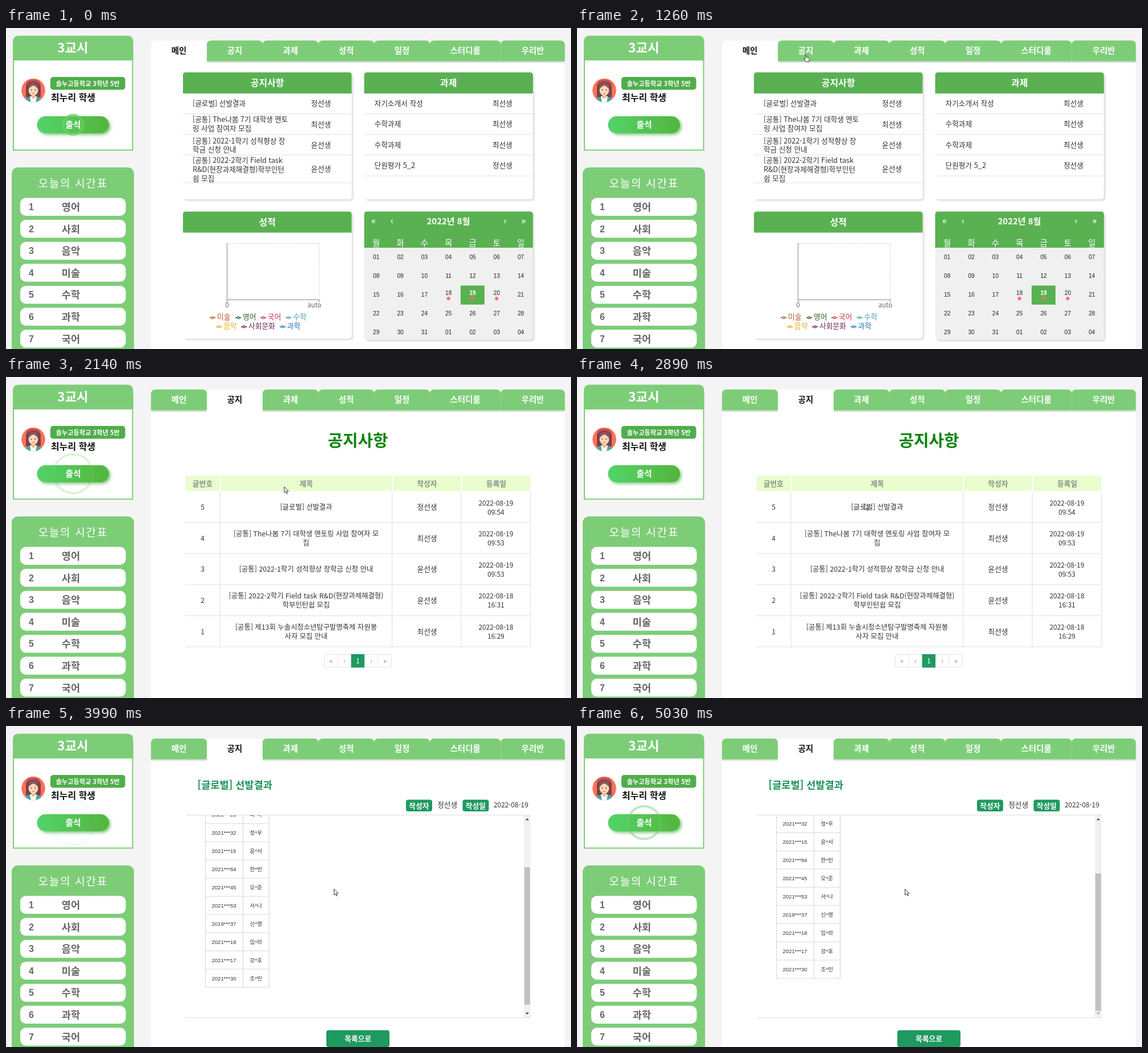
Recreate the animation shown at these times as an HTML page. Size 993 px wide and 564 px high, loop 5100 ms.

```html
<!DOCTYPE html>
<html lang="ko">
<head>
<meta charset="utf-8">
<title>학교 포털</title>
<style>
html, body { margin: 0; width: 100%; height: 100%; overflow: hidden; background: #f4f4f4; }
svg { display: block; width: 993px; height: 564px; font-family: "Noto Sans CJK KR", "Noto Sans CJK JP", "Noto Sans CJK", "Noto Sans", sans-serif; }
.arial { font-family: "Liberation Sans", "Noto Sans CJK KR", "Noto Sans CJK JP", "Noto Sans CJK", sans-serif; }
</style>
</head>
<body>
<svg id="stage" viewBox="0 0 993 564" xmlns="http://www.w3.org/2000/svg"></svg>
<script>
const LOOP = 5100, STEP = 70;
const LIGHT = '#7dcd78', GREEN = '#59b151', DEEP = '#1e9a5f', INK = '#333', LINE = '#dedede';

const rect = (x, y, w, h, fill, r = 0, extra = '') =>
  `<rect x="${x}" y="${y}" width="${w}" height="${h}" fill="${fill}" rx="${r}" ${extra}/>`;
const line = (x1, y1, x2, y2, color = LINE, extra = '') =>
  `<path d="M${x1} ${y1}L${x2} ${y2}" stroke="${color}" fill="none" ${extra}/>`;
const text = (x, y, str, size, fill = INK, weight = 400, anchor = 'middle', extra = '') =>
  `<text x="${x}" y="${y}" font-size="${size}" fill="${fill}" font-weight="${weight}" text-anchor="${anchor}" ${extra}>${str.replace(/&/g, '&amp;')}</text>`;
const left = (x, y, str, size, fill, weight, extra) => text(x, y, str, size, fill, weight, 'start', extra);
const topRound = (x, y, w, h, r, fill, extra = '') =>
  `<path d="M${x} ${y + h}v${r - h}q0 ${-r} ${r} ${-r}h${w - 2 * r}q${r} 0 ${r} ${r}v${h - r}z" fill="${fill}" ${extra}/>`;
const ARIAL = 'class="arial"';

const defs = `<defs>
  <linearGradient id="pill"><stop stop-color="#53d469"/><stop offset="1" stop-color="#53b53d"/></linearGradient>
  <filter id="pillShadow" x="-20%" y="-50%" width="140%" height="220%"><feDropShadow dx="3" dy="3" stdDeviation="2.5" flood-color="#4fb04a" flood-opacity=".65"/></filter>
  <filter id="cardShadow"><feDropShadow dx="2.5" dy="2.5" stdDeviation="1.5" flood-opacity=".14"/></filter>
  <filter id="tabShadow" y="-20%" height="150%"><feDropShadow dx="0" dy="2" stdDeviation="1.3" flood-opacity=".2"/></filter>
  <clipPath id="face"><circle cx="48" cy="109.5" r="21"/></clipPath>
  <clipPath id="scrollBox"><rect x="316" y="157" width="594" height="355"/></clipPath>
</defs>`;

function avatar() {
  return `<g clip-path="url(#face)">
    <circle cx="48" cy="109.5" r="21" fill="#ff7058"/>
    <path d="M35 121V104q0-13 13-13t13 13v17q-4 3-8 0H43q-4 3-8 0z" fill="#77424a"/>
    <path d="M32 132q0-9 9-11l7 3 7-3q9 2 9 11z" fill="#4ba6a0"/>
    <path d="M42 120h12l-2 12h-8z" fill="#fff"/>
    <path d="M44.500 115h7v7l-3.500 3-3.500-3z" fill="#eebb95"/>
    <ellipse cx="48" cy="108.500" rx="8.500" ry="10.500" fill="#fbd9b9"/>
    <path d="M39 109q-1-13 9-13t9 13q-3-6-9-8-6 2-9 8z" fill="#8f535a"/>
    <path d="M36 101q2-10 12-10t12 10q-5-7-12-7t-12 7z" fill="#c94f50"/>
    <circle cx="44.500" cy="109" r="1" fill="#4b3435"/><circle cx="51.500" cy="109" r="1" fill="#4b3435"/>
    <path d="M45.500 114.500q2.500 2 5 0" stroke="#d35b55" fill="none"/>
  </g>`;
}

function sidebar() {
  const subjects = ['영어', '사회', '음악', '미술', '수학', '과학', '국어'];
  return rect(13, 30, 209.5, 184.500, '#fff', 0, `stroke="${LIGHT}" stroke-width="2"`)
    + topRound(12, 13.5, 211.5, 43.5, 11, LIGHT)
    + text(117.5, 42.5, '3교시', 22.4, '#fff', 800)
    + avatar()
    + rect(78, 86, 131.5, 22.5, '#4fae4b', 5)
    + text(143.8, 101.5, '솔누고등학교 3학년 5반', 11.2, '#fff', 700)
    + left(79, 128, '최누리 학생', 16, '#111', 700)
    + `<circle id="ring" cx="118" cy="169.7" fill="none" stroke="${LIGHT}" stroke-width="4"/>`
    + rect(54.5, 155, 126.5, 30, 'url(#pill)', 15, 'filter="url(#pillShadow)"')
    + `<circle id="ringTint" cx="118" cy="169.7" fill="none" stroke="#8fd88a" stroke-width="4"/>`
    + text(118, 175.2, '출석', 14.8, '#fff', 700)
    + rect(10, 245, 215, 340, LIGHT, 11)
    + left(56.5, 279.5, '오늘의 시간표', 19.2, '#fff', 500, 'letter-spacing="1.600"')
    + subjects.map((name, i) => {
      const y = 298.5 + i * 38.6;
      return rect(25, y, 185.5, 31.5, '#fff', 10)
        + left(40, y + 21.5, String(i + 1), 16, '#666', 700, ARIAL)
        + text(114, y + 22.5, name, 17.6, '#666', 700);
    }).join('');
}

const tabEdges = [255, 353, 451, 549, 647, 745, 869.5, 982];
const tabNames = ['메인', '공지', '과제', '성적', '일정', '스터디룸', '우리반'];
function tabs(active) {
  const shape = (name, i) => {
    const x = tabEdges[i], w = tabEdges[i + 1] - x, on = i === active;
    return topRound(x, 22, w, on ? 42 : 36.5, 8, on ? '#fff' : LIGHT)
      + text(x + w / 2, 45, name, 14.4, on ? '#111' : '#fff', 700);
  };
  const others = tabNames.map((n, i) => i === active ? '' : shape(n, i)).join('');
  return `<g filter="url(#tabShadow)">${others}</g>` + shape(tabNames[active], active);
}

function card(x, y, h, title) {
  return rect(x, y, 296.5, h, '#fff', 5, 'filter="url(#cardShadow)"')
    + topRound(x, y, 296.5, 37, 5, GREEN)
    + text(x + 148.2, y + 24, title, 16, '#fff', 700);
}

const rows = (x, ys) => ys.map(y => line(x, y + .5, x + 296.5, y + .5)).join('');

function noticeCard() {
  const lines = [[137, '[글로벌] 선발결과'], [165, '[공통] The나봄 7기 대학생 멘토'], [181, '링 사업 참여자 모집'],
    [202.5, '[공통] 2022-1학기 성적향상 장'], [218, '학금 신청 안내'], [237, '[공통] 2022-2학기 Field task'],
    [252.5, 'R&D(현장과제해결형)학부인턴'], [268.5, '쉽 모집']];
  const authors = [[137, '정선생'], [173.5, '최선생'], [209.5, '윤선생'], [252, '윤선생']];
  return card(311, 78, 223, '공지사항') + rows(311, [150.5, 186.5, 222.5, 271.5])
    + lines.map(([y, s]) => left(328, y, s, 12.6)).join('')
    + authors.map(([y, s]) => text(553.5, y, s, 12.7)).join('');
}

function taskCard() {
  const tasks = ['자기소개서 작성', '수학과제', '수학과제', '단원평가 5_2'];
  return card(629.5, 78, 223, '과제') + rows(629.5, [150.5, 186.5, 222.5, 259.5])
    + tasks.map((s, i) => left(647.5, 137 + 36.3 * i, s, 12.7)
      + text(872.5, 137 + 36.3 * i, i < 3 ? '최선생' : '정선생', 12.7)).join('');
}

function gradeCard() {
  const legend = [[358, 511.5, '미술', '#b5572a'], [403, 511.5, '영어', '#2d5a1f'], [447, 511.5, '국어', '#c0394b'],
    [491.5, 511.5, '수학', '#4aa5a5'], [369, 527.5, '음악', '#e8a81c'], [413, 527.5, '사회문화', '#6b2350'], [481, 527.5, '과학', '#1f77b4']];
  return card(311, 322.5, 223, '성적')
    + line(389, 378.5, 550, 378.5, '#ccc', 'stroke-dasharray="2.400"')
    + line(550.5, 378, 550.5, 477, '#ccc', 'stroke-dasharray="2.400"')
    + `<path d="M388.500 378V477.500H550.500M388.500 477v5M550.500 477v5" stroke="#8a8a8a" fill="none"/>`
    + text(388.5, 491, '0', 11.6, '#666') + text(542, 491, 'auto', 11.4, '#666')
    + legend.map(([x, y, s, c]) => line(x, y - 2.5, x + 10.5, y - 2.5, c, 'stroke-width="1.500"')
      + `<circle cx="${x + 5.2}" cy="${y - 2.5}" r="1.800" fill="#fff" stroke="${c}" stroke-width="1.300"/>`
      + left(x + 13, y, s, 12.8, c)).join('');
}

function calendar() {
  const cx = i => 650.7 + 42.35 * i;
  let out = rect(629.5, 322.5, 296.5, 225.5, '#f0f0f0', 5, 'filter="url(#cardShadow)"')
    + topRound(629.5, 322.5, 296.5, 63.5, 5, GREEN)
    + text(777.5, 344.5, '2022년 8월', 15, '#fff', 700);
  [[646, '«'], [678.5, '‹'], [877, '›'], [909.5, '»']].forEach(([x, s]) => out += text(x, 343.5, s, 15, '#fff', 700));
  [...'월화수목금토일'].forEach((s, i) => out += text(cx(i), 382.5, s, 14.4, '#fff'));
  out += rect(799, 452.5, 42, 33.5, GREEN);
  for (let i = 0; i < 35; i++) {
    const day = i % 31 + 1, col = i % 7, marked = i > 16 && i < 20;
    const y = 406.3 + 33 * Math.floor(i / 7) - (marked ? 3 : 0);
    out += text(cx(col), y, String(day).padStart(2, '0'), 10.2, i === 18 ? '#fff' : '#222', i === 18 ? 700 : 400, 'middle', ARIAL);
    if (marked) out += `<circle cx="${cx(col)}" cy="475.300" r="3.100" fill="#f87171"/>`;
  }
  return out;
}

function listPage() {
  const cols = [[315.5, 375.5, '글번호'], [377.5, 678, '제목'], [680.5, 799.5, '작성자'], [802, 921.5, '등록일']];
  const posts = [
    [['[글로벌] 선발결과'], '정선생', '19', '09:54'],
    [['[공통] The나봄 7기 대학생 멘토링 사업 참여자 모', '집'], '최선생', '19', '09:53'],
    [['[공통] 2022-1학기 성적향상 장학금 신청 안내'], '윤선생', '19', '09:53'],
    [['[공통] 2022-2학기 Field task R&D(현장과제해결형)', '학부인턴쉽 모집'], '윤선생', '18', '16:31'],
    [['[공통] 제13회 누솔시청소년탐구발명축제 자원봉', '사자 모집 안내'], '최선생', '18', '16:29']];
  let out = text(618.5, 122, '공지사항', 28.8, '#0b840b', 700);
  cols.forEach(([a, b, s]) => {
    out += rect(a, 173, b - a, 27.5, '#e9fdce') + text((a + b) / 2, 191.5, s, 12.8, '#8a8f86', 700)
      + line(b + .5, 201, b + .5, 474);
  });
  posts.forEach(([title, author, day, time], i) => {
    const y = 233 + 54.65 * i;
    out += line(315.5, 255.5 + 54.65 * i, 921.5, 255.5 + 54.65 * i)
      + text(345.5, y, String(5 - i), 12) + text(740, y, author, 12.7)
      + text(861, y - 7.5, '2022-08-' + day, 11.9) + text(861, y + 8.5, time, 11.9);
    title.forEach((s, k) => out += text(527.5, y + (title.length > 1 ? k * 16 - 8 : 0), s, 12.4));
  });
  out += rect(559.5, 487.5, 117.5, 22.5, '#fff', 3, 'stroke="#dee2e6"') + rect(606.5, 487, 23.5, 23.5, DEEP);
  [583, 654].forEach(x => out += line(x, 488, x, 510, '#dee2e6'));
  [...'«‹1›»'].forEach((s, i) => out += text(571 + 23.7 * i, 503, s, 12, i === 2 ? '#fff' : '#4a9b78'));
  return out;
}

function detailPage() {
  const members = ['2021***23 최*아', '2021***32 정*우', '2021***15 윤*서', '2021***84 한*빈', '2021***45 오*준',
    '2021***53 서*나', '2019***37 신*영', '2021***18 임*라', '2021***17 강*호', '2021***30 조*민'];
  const pitch = 31.97, bottom = 256 + pitch * 10;
  let table = text(612, 187.3, '학교 추천 대상자 입니다. 재단에서는 학교 추천자 10명중 7명을 최종 선발 예정입니다.', 10.4)
    + text(612, 210, '본인 확인이 어려울 경우 학생나눔팀으로 연락 주시기 바랍니다(내선 0000).', 10.4)
    + rect(350, 224, 112.5, 32, '#545454') + line(416.5, 224, 416.5, 256, '#777')
    + text(383, 243.5, '학번', 9.6, '#fff') + text(439.3, 243.5, '성명', 9.6, '#fff');
  members.forEach((m, i) => {
    const y = 256 + pitch * i, [id, name] = m.split(' ');
    table += text(383, y + 20, id, 9.6) + text(439.3, y + 20, name, 9.6)
      + line(350, y + pitch, 463, y + pitch, '#d9d9d9');
  });
  [350.5, 416.5, 462.5].forEach(x => table += line(x, 256, x, bottom, '#d4d4d4'));
  return left(336.5, 110, '[글로벌] 선발결과', 17.6, '#1a9257', 700)
    + rect(703, 129.5, 46, 20.5, DEEP, 4) + text(726, 144.5, '작성자', 12.8, '#fff', 700)
    + text(775.7, 142.5, '정선생', 12.7)
    + rect(802.5, 129.5, 46, 20.5, DEEP, 4) + text(825.5, 144.5, '작성일', 12.8, '#fff', 700)
    + text(887.5, 142.5, '2022-08-19', 11.9)
    + `<g clip-path="url(#scrollBox)"><g id="scrolled" ${ARIAL}>${table}</g></g>`
    + rect(910, 157, 12, 355, '#f1f1f1')
    + '<rect id="thumb" x="911" width="10" height="241.500" fill="#c1c1c1"/>'
    + '<path id="up" d="M913 165.500l3-3.500 3 3.500z"/><path id="down" d="M913 503.500l3 3.500 3-3.500z"/>'
    + line(316, 156.5, 922, 156.5) + line(316, 512.5, 922, 512.5)
    + rect(563, 534.5, 111, 29.5, DEEP, 4) + text(618.5, 554, '목록으로', 12.8, '#fff', 700);
}

const stage = document.getElementById('stage');
const arrowShape = '<path d="M.5.500v10.500l2.400-2.200 1.700 3.700 1.600-.700-1.700-3.600h3.300z"';
const handShape = '<path d="M2 1.500q1-1.500 2 0v4l4.300 1q1.200.500 1 2l-.800 4.500h-5L.300 9q-.400-1.700 1.700-.800z"';
const paint = ' fill="#fff" stroke="#222" stroke-width=".900" stroke-linejoin="round"/>';
stage.innerHTML = defs + rect(0, 0, 993, 564, '#f4f4f4') + sidebar()
  + rect(255, 58, 727, 506, '#fff')
  + `<g id="main">${tabs(0)}${noticeCard()}${taskCard()}${gradeCard()}${calendar()}</g>`
  + `<g id="notice">${tabs(1)}<g id="list">${listPage()}</g><g id="detail">${detailPage()}</g></g>`
  + `<g id="cursor"><g id="arrow">${arrowShape}${paint}</g><g id="hand">${handShape}${paint}</g></g>`;

const el = {};
stage.querySelectorAll('[id]').forEach(n => el[n.id] = n);
const show = (node, on) => node.setAttribute('display', on ? 'inline' : 'none');
const clamp = v => Math.max(0, Math.min(1, v));

// CSS "ease": cubic-bezier(.25, .1, .25, 1), solved by bisection
function ease(x) {
  const bez = (a, b, s) => 3 * a * s * (1 - s) ** 2 + 3 * b * s * s * (1 - s) + s ** 3;
  let lo = 0, hi = 1;
  for (let i = 0; i < 20; i++) {
    const mid = (lo + hi) / 2;
    if (bez(.25, .25, mid) < x) lo = mid; else hi = mid;
  }
  return bez(.1, 1, lo);
}

const path = [[560, 412, -16], [1120, 399, 46], [1740, 399, 46.5], [2210, 503, 216], [2420, 505, 222],
  [3030, 505, 222], [3400, 568, 277], [3440, 568, 277], [3580, 576, 286]];
function cursorAt(t) {
  const i = path.findIndex(k => k[0] > t);
  if (i < 0) return path[path.length - 1].slice(1);
  if (i === 0) return path[0].slice(1);
  const [t0, x0, y0] = path[i - 1], [t1, x1, y1] = path[i];
  const p = (t - t0) / (t1 - t0), s = p * p * (3 - 2 * p);
  return [x0 + (x1 - x0) * s, y0 + (y1 - y0) * s];
}

function draw(t) {
  const grow = ease(((t + 205) % 1550) / 1550);
  for (const [node, alpha] of [[el.ring, 1], [el.ringTint, .4]]) {
    node.setAttribute('r', 13 + 27 * grow);
    node.setAttribute('opacity', alpha * (1 - grow));
  }

  show(el.main, t < 1400);
  show(el.notice, t >= 1400);
  show(el.list, t < 2960);
  show(el.detail, t >= 2960);

  const scroll = 132.5 * (1 - (1 - clamp((t - 3620) / 730)) ** 3);
  el.scrolled.setAttribute('transform', `translate(0 ${-scroll})`);
  el.thumb.setAttribute('y', 168.5 + scroll * .683);
  el.up.setAttribute('fill', scroll > 0 ? '#444' : '#a3a3a3');
  el.down.setAttribute('fill', scroll < 132.4 ? '#444' : '#a3a3a3');

  const [x, y] = cursorAt(t);
  const onTab = y > 22 && y < 59;
  el.cursor.setAttribute('transform', `translate(${x} ${y})`);
  show(el.hand, onTab);
  show(el.arrow, !onTab);
}

function tick() {
  const t = performance.now() % LOOP;
  draw(Math.floor(t / STEP) * STEP);
  requestAnimationFrame(tick);
}
tick();
</script>
</body>
</html>
```
